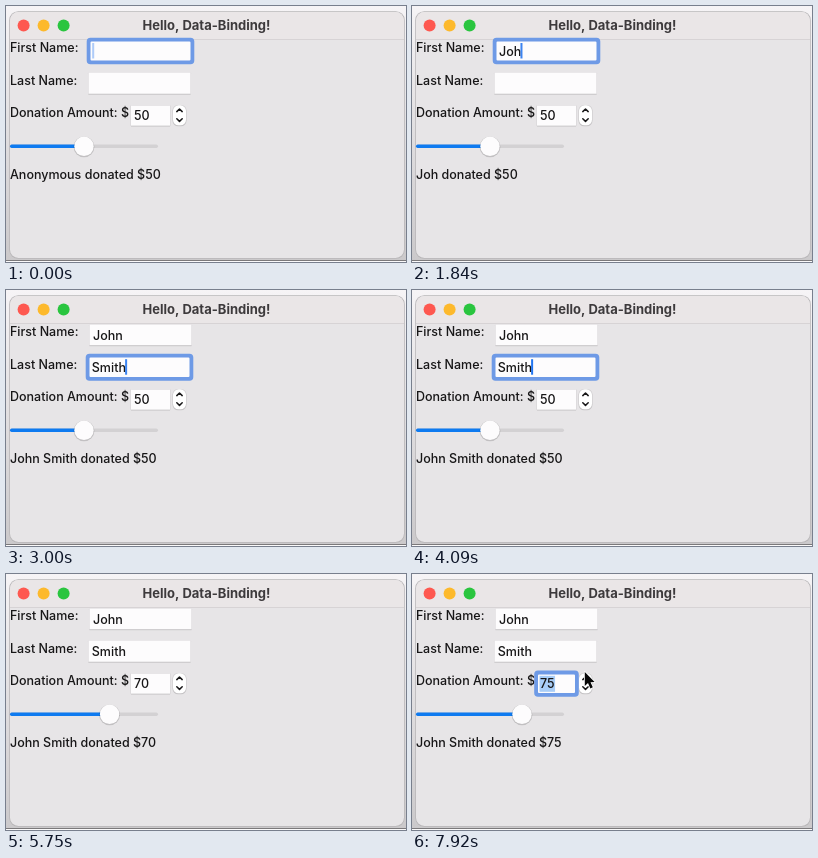
An HTML page with a canvas that plays this animation: 400 by 256 pixels, repeating every 8 s.

```html
<!DOCTYPE html>
<html lang="en">
<head>
<meta charset="utf-8">
<title>Data binding demo</title>
<style>
  html, body { margin: 0; width: 100%; height: 100%; overflow: hidden; background: #fff; }
  canvas { display: block; width: 400px; height: 256px; }
</style>
</head>
<body>
<canvas></canvas>
<script>
const LOOP = 8000;
const FONT = '500 12.5px Inter, sans-serif';
const canvas = document.querySelector('canvas');
const ctx = canvas.getContext('2d');
const scale = window.devicePixelRatio || 1;
canvas.width = 400 * scale;
canvas.height = 256 * scale;

const boxes = {
  first: { x: 83.5, y: 34.5, w: 102, h: 21, r: 1, textX: 87, baseline: 49.5 },
  last: { x: 82.5, y: 66.5, w: 102, h: 21.5, r: 1, textX: 85.8, baseline: 81.7 },
  amount: { x: 125, y: 99.4, w: 39, h: 20.5, r: 1, textX: 128, baseline: 114.3 },
  stepper: { x: 167, y: 99.3, w: 13, h: 20, r: 5.5 }
};

// Each list holds [time, value]; the newest entry not in the future applies.
const firstKeys = [[0, ''], [1500, 'J'], [1670, 'Jo'], [1840, 'Joh'], [2000, 'John']];
const lastKeys = [[0, ''], [2510, 'S'], [2590, 'Sm'], [2750, 'Smi'], [2840, 'Smit'], [3000, 'Smith']];
const amounts = [[0, 50], [4590, 60], [5000, 70], [7090, 71], [7250, 72], [7420, 73], [7590, 74], [7750, 75]];
const focuses = [[-1000, 'first'], [2370, 'last'], [4170, 'amount'], [4420, 'none'], [6650, 'stepper'], [7085, 'amount']];
const caretResets = [[70, 0], ...firstKeys.slice(1), [2370, 0], ...lastKeys.slice(1)];
const pointerPaths = [
  { from: 90, to: 1500, points: [[90, 319, 112], [250, 319, 112], [330, 271, 94], [590, 271, 94], [1050, 149, 47]] },
  { from: 5920, to: LOOP, points: [[5920, 149, 47], [6250, 183, 92], [6650, 172.6, 101.5], [7000, 172.6, 101.5], [7170, 172.8, 98]] }
];

const clamp = v => Math.max(0, Math.min(1, v));
const latest = (list, t) => list.findLast(([time]) => time <= t) || list[0];

function along(points, t) {
  const i = points.findIndex(p => p[0] > t);
  if (i < 0) return points.at(-1).slice(1);
  const a = points[i - 1], b = points[i];
  const p = (t - a[0]) / (b[0] - a[0]);
  const e = p * p * (3 - 2 * p);
  return [a[1] + (b[1] - a[1]) * e, a[2] + (b[2] - a[2]) * e];
}

function roundRect(x, y, w, h, r, fill) {
  ctx.beginPath();
  ctx.roundRect(x, y, w, h, r);
  ctx.fillStyle = fill;
  ctx.fill();
}

function circle(x, y, r, fill) {
  ctx.beginPath();
  ctx.arc(x, y, r, 0, Math.PI * 2);
  ctx.fillStyle = fill;
  ctx.fill();
}

function polyline(points, color, width, filled) {
  ctx.beginPath();
  points.forEach(([x, y]) => ctx.lineTo(x, y));
  if (filled) ctx.closePath();
  ctx.strokeStyle = color;
  ctx.lineWidth = width;
  ctx.lineCap = ctx.lineJoin = 'round';
  ctx.stroke();
  if (filled) {
    ctx.fillStyle = filled;
    ctx.fill();
  }
}

function text(string, x, baseline) {
  ctx.font = FONT;
  ctx.textAlign = 'left';
  ctx.fillStyle = '#171617';
  ctx.fillText(string, x, baseline);
}

function drawWindow() {
  const backdrop = ctx.createLinearGradient(0, 0, 0, 254);
  backdrop.addColorStop(0, '#f6f4f6');
  backdrop.addColorStop(1, '#cbc9cb');
  ctx.fillStyle = '#fbfafb';
  ctx.fillRect(0, 0, 400, 256);
  ctx.fillStyle = backdrop;
  ctx.fillRect(0, 0, 400, 254);
  ctx.fillStyle = '#7b797b';
  ctx.fillRect(0, 254, 400, 1);
  roundRect(3.2, 5.2, 395.6, 247.6, 9, '#b9b7b9');
  roundRect(4, 6, 394, 246, 8.5, '#e7e5e7');
  roundRect(4, 6, 394, 28, [8.5, 8.5, 0, 0], '#eae6e7');
  ctx.fillStyle = '#d2cfd1';
  ctx.fillRect(4, 33.2, 394, 0.8);
  circle(17.6, 19.5, 6, '#fe5850');
  circle(37.6, 19.5, 6, '#fdb92c');
  circle(57.6, 19.5, 6, '#2ac53f');
  ctx.font = '700 13px Inter, sans-serif';
  ctx.textAlign = 'center';
  ctx.fillStyle = '#3d3a3c';
  ctx.fillText('Hello, Data-Binding!', 200.5, 24.2);
}

// The ring starts wide and faint, then tightens until it overlaps the control's edge.
function drawRing({ x, y, w, h, r }, age) {
  const p = clamp(age / 260);
  const pad = 2.8 + 16.5 * (1 - p);
  const alpha = 0.04 + 0.96 * Math.pow(p, 1.6);
  ctx.beginPath();
  ctx.roundRect(x - pad, y - pad, w + 2 * pad, h + 2 * pad, r + Math.min(pad, 12));
  ctx.roundRect(x + p, y + p, w - 2 * p, h - 2 * p, r);
  ctx.fillStyle = `rgba(${110 + 30 * (1 - p)},${154 + 50 * (1 - p)},230,${alpha})`;
  ctx.fill('evenodd');
}

function drawField(box, value, selected, caretAlpha) {
  roundRect(box.x - 0.5, box.y - 0.3, box.w + 1, box.h + 1, 1, 'rgba(0,0,0,.09)');
  roundRect(box.x, box.y, box.w, box.h, 0, '#fdfcfd');
  ctx.fillStyle = '#cbc9cb';
  ctx.fillRect(box.x, box.y + box.h - 0.3, box.w, 0.9);
  ctx.font = FONT;
  const width = ctx.measureText(value).width;
  if (selected) {
    ctx.fillStyle = '#a8cdf7';
    ctx.fillRect(box.textX - 0.5, box.baseline - 12.5, width + 1, 16);
  }
  text(value, box.textX, box.baseline);
  if (caretAlpha) {
    ctx.fillStyle = `rgba(32,116,240,${caretAlpha})`;
    ctx.fillRect(box.textX + width - 0.8, box.baseline - 12.5, 2, 15.5);
  }
}

function drawStepper({ x, y, w, h, r }) {
  roundRect(x - 0.5, y - 0.2, w + 1, h + 1.2, r, '#c6c4c6');
  roundRect(x, y, w, h, r, '#fff');
  polyline([[170.8, 105.6], [173.5, 103], [176.2, 105.6]], '#171617', 1.5);
  polyline([[170.8, 112.8], [173.5, 115.4], [176.2, 112.8]], '#171617', 1.5);
}

function drawSlider(value) {
  const x = 14 + 1.28 * value;
  roundRect(4, 138.6, 148, 3.4, 1.7, '#d3d1d3');
  roundRect(4, 138.6, x - 4, 3.4, 1.7, '#0e7af0');
  circle(x, 140.9, 10.4, 'rgba(0,0,0,.16)');
  circle(x, 140.3, 9.7, '#fdfcfd');
}

function drawPointer(t) {
  const path = pointerPaths.find(p => t >= p.from && t < p.to);
  if (!path) return;
  const [x, y] = along(path.points, t);
  const { x: left, y: top, w, h } = boxes.first;
  ctx.save();
  ctx.translate(x, y);
  if (x > left && x < left + w && y > top && y < top + h) {
    for (const [color, width] of [['#fff', 3], ['#111', 1.4]]) {
      polyline([[-3, -7], [-1, -6.6], [0, -5.5], [1, -6.6], [3, -7]], color, width);
      polyline([[0, -5.5], [0, 5.5]], color, width);
      polyline([[-3, 7], [-1, 6.6], [0, 5.5], [1, 6.6], [3, 7]], color, width);
      polyline([[-1.5, 2.5], [1.5, 2.5]], color, width);
    }
  } else {
    polyline([[0, 0], [0, 14], [3.2, 11], [5.6, 16.4], [8, 15.3], [5.7, 10.2], [9.8, 10]], '#fff', 1.6, '#080808');
  }
  ctx.restore();
}

function draw(t) {
  const first = latest(firstKeys, t)[1];
  const last = latest(lastKeys, t)[1];
  const amount = latest(amounts, t)[1];
  const [focusTime, focus] = latest(focuses, t);
  const caretAge = t - latest(caretResets, t)[0];
  const blink = clamp(0.5 + 1.2 * Math.cos(2 * Math.PI * (caretAge - 200) / 1000));
  const donor = [first, last].filter(Boolean).join(' ') || 'Anonymous';

  ctx.setTransform(scale, 0, 0, scale, 0, 0);
  drawWindow();
  text('First Name:', 4, 46.4);
  text('Last Name:', 4, 79);
  text('Donation Amount: $', 4, 111.4);
  drawField(boxes.first, first, false, focus === 'first' && blink);
  drawField(boxes.last, last, false, focus === 'last' && blink);
  drawField(boxes.amount, String(amount), focus === 'amount', 0);
  drawStepper(boxes.stepper);
  drawSlider(amount);
  text(`${donor} donated $${amount}`, 4, 173.4);
  if (boxes[focus]) drawRing(boxes[focus], t - focusTime);
  drawPointer(t);
}

function tick() {
  draw(performance.now() % LOOP);
  requestAnimationFrame(tick);
}
tick();
</script>
</body>
</html>
```
